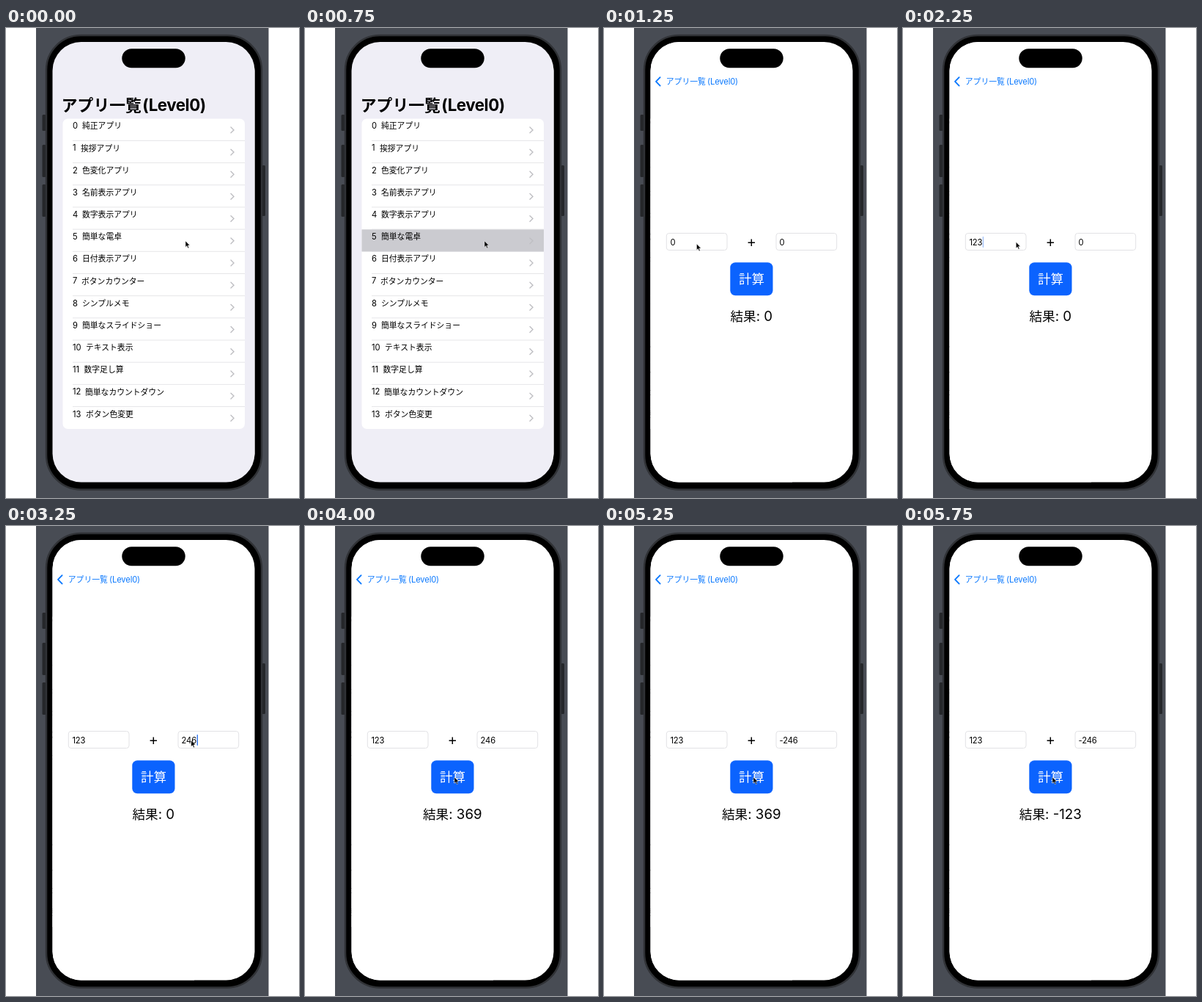
Write an HTML page that moves like this. It is 400 px wide and 640 px high and loops after 6000 ms.

```html
<!DOCTYPE html>
<html lang="ja">
<head>
<meta charset="utf-8">
<title>アプリ一覧</title>
<style>
html, body { margin: 0; width: 100%; height: 100%; overflow: hidden; background: #fff; }
svg { display: block; width: 400px; height: 640px; }
text { font-family: Inter, "Noto Sans CJK JP", "Noto Sans CJK", sans-serif; white-space: pre; }
.ja { font-family: "Noto Sans CJK JP", "Noto Sans CJK", sans-serif; }
.list { font-size: 11.2px; letter-spacing: -.15px; }
.list .ja { font-size: 10.8px; letter-spacing: 0; }
.field { fill: #fff; stroke: #e2e2e5; stroke-width: 1; }
</style>
</head>
<body>
<svg viewBox="0 0 400 640">
  <defs>
    <clipPath id="screen"><rect x="63.5" y="19" width="276" height="599.5" rx="39"/></clipPath>
    <clipPath id="card"><rect x="77.5" y="123.5" width="248.5" height="422.5" rx="7"/></clipPath>
  </defs>

  <rect x="41" width="317.5" height="640" fill="#484c54"/>
  <g fill="#25272a">
    <rect x="49.5" y="118" width="5" height="22" rx="1.5"/>
    <rect x="49.5" y="159" width="5" height="44" rx="1.5"/>
    <rect x="49.5" y="213" width="5" height="44" rx="1.5"/>
    <rect x="349.5" y="187" width="4.5" height="69" rx="1.5"/>
  </g>
  <rect x="55" y="10" width="294" height="618.5" rx="47" stroke="#303236" stroke-width="2.5"/>

  <g clip-path="url(#screen)">
    <g id="home">
      <rect x="63" y="19" width="277" height="600" fill="#efeef6"/>
      <g clip-path="url(#card)">
        <rect x="77" y="123" width="250" height="424" fill="#fff"/>
        <rect id="pressed" x="77" y="274.3" width="250" height="30.2" fill="#cbcbd0"/>
        <g id="rows" class="list"></g>
      </g>
    </g>
    <rect id="shade" x="63" y="19" width="277" height="600"/>

    <g id="detail">
      <rect x="63" y="19" width="277" height="600" fill="#fff"/>
      <rect class="field" x="85.3" y="279.5" width="82.7" height="23" rx="3.5"/>
      <rect class="field" x="235" y="279.5" width="82.7" height="23" rx="3.5"/>
      <g class="list">
        <text id="first" x="90.4" y="295.8"></text>
        <text id="second" x="239.6" y="295.8"></text>
      </g>
      <path d="M196.6 292.3h9.4M201.3 287.6v9.4" stroke="#000" stroke-width="1.5"/>
      <rect x="172.3" y="319.3" width="58.2" height="45" rx="7" fill="#0b63fe"/>
      <text class="ja" x="201.5" y="348.4" font-size="17.6" text-anchor="middle" fill="#fff">計算</text>
      <text x="201.3" y="399.3" font-size="18.7" text-anchor="middle"><tspan class="ja" font-size="17.6">結果</tspan><tspan id="result"></tspan></text>
      <rect id="caret" y="284" width="1.4" height="15" rx=".7" fill="#2f74ee"/>
    </g>

    <g id="bigTitle" font-weight="700">
      <text class="ja" x="0" y="8.3" font-size="21.8">アプリ一覧</text>
      <text x="110.5" y="8.3" font-size="22.3" letter-spacing="-.45">(Level0)</text>
    </g>
    <g id="backTitle" class="list" fill="#0a78fe">
      <text class="ja" x="0" y="4">アプリ一覧</text>
      <text x="56.3" y="4">(Level0)</text>
    </g>
    <path id="back" d="M76.6 67.2l-5.6 5.7 5.6 5.7" fill="none" stroke="#0a78fe" stroke-width="1.9" stroke-linecap="round" stroke-linejoin="round"/>
  </g>

  <rect x="158.3" y="28.3" width="86.4" height="26" rx="13"/>
  <path id="pointer" d="M0 0v8.4l1.9-1.8 1.5 3.2 1.3-.6-1.4-3.1h2.6z" stroke="#fff" stroke-width=".6" stroke-opacity=".75"/>
</svg>

<script>
const LOOP = 6000, STEP = 250, ROW = 30.18;
const $ = id => document.getElementById(id);

// label and the x where it begins
const apps = [
  ['純正アプリ', 104], ['挨拶アプリ', 102], ['色変化アプリ', 104], ['名前表示アプリ', 104],
  ['数字表示アプリ', 104], ['簡単な電卓', 104], ['日付表示アプリ', 104], ['ボタンカウンター', 103],
  ['シンプルメモ', 104], ['簡単なスライドショー', 104], ['テキスト表示', 109], ['数字足し算', 106.5],
  ['簡単なカウントダウン', 108], ['ボタン色変更', 109]
];
$('rows').innerHTML = apps.map(([label, x], i) => `<g transform="translate(0 ${i * ROW})">
  <text x="91" y="137.2">${i}</text><text class="ja" x="${x}" y="137.4">${label}</text>
  <path d="M307 135l4 3.9-4 3.9" fill="none" stroke="#bfbfc3" stroke-width="1.4" stroke-linecap="round"/>
  ${i < apps.length - 1 ? '<path d="M91 153.4H326" stroke="#dcdcdf" stroke-width=".7"/>' : ''}</g>`).join('');

// each step changes only what it names
const steps = {
  0: { push: 0, pressed: 0, first: '0', second: '0', result: '0', caret: [91, 0], pointer: [245, 290] },
  500: { pressed: 1 },
  1000: { push: .763 },
  1250: { push: 1, pointer: [126.5, 294] },
  1500: { caret: [97.5, 1] },
  1750: { first: '1', caret: [95.5, 1] },
  2000: { first: '12', caret: [102.5, 1] },
  2250: { first: '123', caret: [108.7, .45], pointer: [154.3, 291.5] },
  2500: { caret: [246.5, 1], pointer: [256, 292] },
  2750: { second: '2', pointer: [252.7, 292] },
  3000: { second: '24', caret: [253.5, 1] },
  3250: { second: '246', caret: [260.6, 1] },
  3500: { caret: [260.6, 0], pointer: [204, 342] },
  3750: { caret: [260.6, 1] },
  4000: { result: '369', caret: [260.6, 0] },
  4250: { caret: [260.6, 1] },
  4500: { caret: [239.4, 1] },
  4750: { second: '-246', caret: [244.8, 1] },
  5000: { caret: [244.8, .5] },
  5250: { caret: [244.8, 0] },
  5500: { result: '-123', caret: [244.8, 1] },
  5750: { caret: [244.8, 0] }
};

const stateAt = time => Object.keys(steps).reduce(
  (state, at) => +at <= time ? { ...state, ...steps[at] } : state, {});
const set = (id, attrs) => { for (const name in attrs) $(id).setAttribute(name, attrs[name]); };
const mix = (a, b, p) => a + (b - a) * p;

function draw(time) {
  const s = stateAt(time), p = s.push;
  set('home', { transform: `translate(${-83 * p} 0)` });
  set('shade', { opacity: .13 * p });
  set('detail', { transform: `translate(${276 * (1 - p)} 0)` });
  set('pressed', { opacity: s.pressed });

  const size = mix(1, .49, p), place = `translate(${mix(75.8, 84.8, p)} ${mix(104.6, 72.8, p)})`;
  set('bigTitle', { transform: `${place} scale(${size})`, opacity: (1 - p) ** (p ? 1 : 0) });
  set('backTitle', { transform: `${place} scale(${size / .49})`, opacity: p });
  set('back', { opacity: Math.max(0, (p - .8) / .2) });

  $('first').textContent = s.first;
  $('second').textContent = s.second;
  $('result').textContent = ': ' + s.result;
  set('caret', { x: s.caret[0], opacity: s.caret[1] });
  set('pointer', { transform: `translate(${s.pointer})` });
}

const start = performance.now();
let shown = -1;
function tick() {
  const time = Math.floor((performance.now() - start) % LOOP / STEP) * STEP;
  if (time !== shown) draw(shown = time);
  requestAnimationFrame(tick);
}
tick();
</script>
</body>
</html>
```
